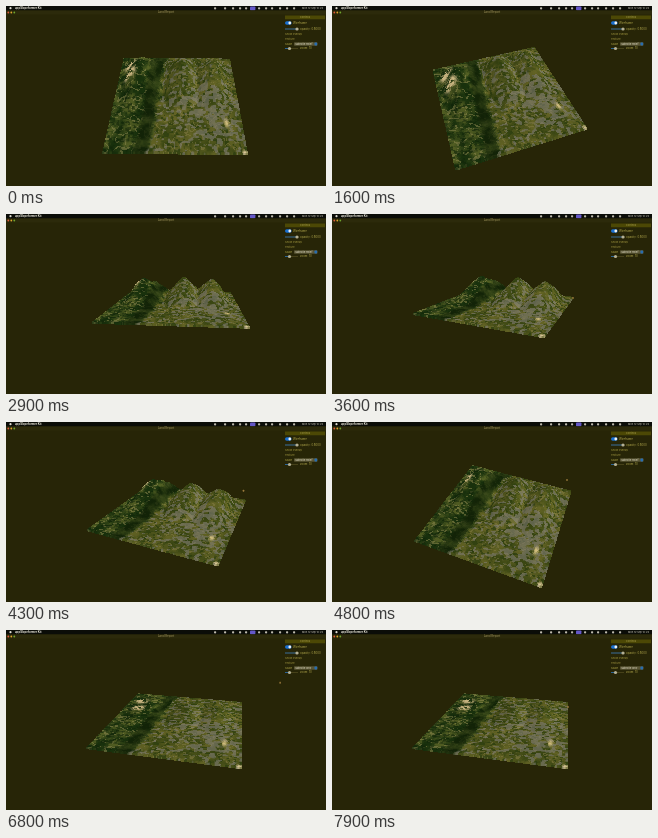
Animation of 320x180 px, one loop 8000 ms. Source, as an HTML page with a canvas:

```html
<!DOCTYPE html>
<html lang="en">
<head>
<meta charset="utf-8">
<title>Terrain viewer</title>
<style>
html, body { margin: 0; width: 100%; height: 100%; overflow: hidden; background: #272507; }
canvas { display: block; width: 320px; height: 180px; }
</style>
</head>
<body>
<canvas id="stage" width="320" height="180"></canvas>
<script>
const W = 320, H = 180, LOOP = 8000, N = 170, DIST = 4.1, BACK = '#272507';
const ctx = document.getElementById('stage').getContext('2d');

// time, yaw, pitch (degrees), scale, centre x, centre y
const VIEW = [
  [0, 0.8, 49.5, 60.5, 170, 92.8],
  [1600, -18.7, 50.5, 59.6, 170.6, 90.8],
  [2900, 5.4, 15, 60, 170, 91],
  [3600, 25, 16.4, 59, 170, 91],
  [4500, 23, 32, 59, 168.5, 92],
  [4800, 22, 48.5, 59, 167.8, 92],
  [5400, 12.4, 27.4, 62.8, 170.8, 91.8],
  [8000, 12.4, 27.4, 62.8, 170.8, 91.8]
];
const RELIEF = [[0, 1], [6500, 1], [6700, 0], [8000, 0]];

const clamp = (v, a = 0, b = 1) => Math.min(b, Math.max(a, v));
const smooth = v => { v = clamp(v); return v * v * (3 - 2 * v); };
const mix = (a, b, k) => a + (b - a) * k;
const blend = (a, b, k) => a.map((v, i) => mix(v, b[i], k));

function at(keys, t) {
  let i = 0;
  while (i < keys.length - 2 && t >= keys[i + 1][0]) i++;
  const a = keys[i], b = keys[i + 1];
  const k = clamp((t - a[0]) / (b[0] - a[0]));
  return blend(a, b, k).slice(1);
}

function hash(x, y) {
  const v = Math.sin(x * 127.1 + y * 311.7) * 43758.5453;
  return v - Math.floor(v);
}

function noise(x, y) {
  const i = Math.floor(x), j = Math.floor(y);
  const u = smooth(x - i), v = smooth(y - j);
  return mix(mix(hash(i, j), hash(i + 1, j), u), mix(hash(i, j + 1), hash(i + 1, j + 1), u), v);
}

const fbm = (x, y) => noise(x, y) * 0.55 + noise(x * 2.1, y * 2.1) * 0.3 + noise(x * 4.3, y * 4.3) * 0.15;

const peak = (x, z, px, pz, w, d) => Math.max(0, 1 - Math.hypot((x - px) / w, (z - pz) / d));

function height(x, z) {
  const rim = smooth((1 - Math.max(Math.abs(x), Math.abs(z))) / 0.3);
  const hills = Math.max(
    0.37 * peak(x, z, -0.62, -0.42, 0.45, 0.75),
    0.27 * peak(x, z, -0.45, -0.6, 0.35, 0.6),
    0.38 * peak(x, z, 0.1, -0.45, 0.36, 0.75),
    0.36 * peak(x, z, 0.6, -0.45, 0.36, 0.75)
  );
  return rim * (hills + 0.06 * fbm(x * 5 + 20, z * 5 + 20) - 0.02);
}

const near = (x, z, px, pz, r) => smooth(1 - Math.hypot(x - px, z - pz) / r);

function ground(x, z) {
  const n = fbm(x * 7 + 40, z * 7 + 40);
  const fine = noise(x * 30 + 90, z * 30 + 90);
  const streak = Math.abs(noise(x * 11 + z * 5 + 70, z * 12 - x * 6 + 70) - 0.5);
  const jag = noise(x * 5 + 15, z * 9 + 15) - 0.5;
  const edge = -0.27 - 0.08 * z + 0.14 * jag;

  let plain = blend([58, 70, 18], [98, 98, 36], smooth(n * 1.8 - 0.4));
  plain = blend(plain, [42, 60, 14], smooth((fine - 0.58) * 4) * 0.75);
  if (streak < 0.03) plain = blend(plain, [132, 124, 70], 0.5);
  const town = 0.1 + 0.3 * near(x, z, 0.6, 0.3, 0.8) + 0.12 * near(x, z, 0.2, 0.1, 0.6);
  const built = smooth((noise(x * 24 + 55, z * 24 + 55) + town - 0.72) * 5);
  plain = blend(plain, [128, 124, 116], built * 0.6);

  let forest = blend([24, 48, 12], [80, 92, 34], smooth(n * 2.4 - 0.65));
  if (streak < 0.05) forest = blend(forest, [136, 132, 76], 0.55);
  forest = blend(forest, [16, 36, 8], smooth((fine - 0.5) * 3) * 0.65);
  const band = smooth((0.13 - Math.abs(x - edge + 0.12 + 0.12 * jag)) / 0.07);
  forest = blend(forest, blend([17, 32, 6], [42, 58, 18], smooth(n * 2 - 0.5)), band * 0.85);

  let c = blend(forest, plain, smooth((x - edge + 0.03) / 0.06));
  const pale = near(x, z, -0.8, -0.65, 0.17) + near(x, z, -0.77, -0.35, 0.17);
  c = blend(c, [222, 200, 142], clamp(pale * smooth((fine - 0.2) * 2.5) * 1.6));
  c = blend(c, [208, 188, 125], near((x - 0.78) * 2.4, z - 0.5, 0, 0, 0.14));
  return blend(c, [225, 205, 155], near(x, z, 0.98, 0.98, 0.05));
}

const relief = new Float32Array(N * N);
const paint = new Uint8ClampedArray(N * N * 3);
const coord = i => i / (N - 1) * 2 - 1;

for (let j = 0; j < N; j++) {
  for (let i = 0; i < N; i++) {
    const x = coord(i), z = coord(j), k = j * N + i;
    relief[k] = height(x, z);
    const slope = (height(x + 0.03, z) - height(x - 0.03, z)) / 0.06;
    const light = clamp(1 - slope * 0.1, 0.88, 1.1);
    paint.set(ground(x, z).map(v => v * light), k * 3);
  }
}

ctx.fillStyle = BACK;
ctx.fillRect(0, 0, W, H);
const blank = ctx.getImageData(0, 0, W, H);
const frame = ctx.createImageData(W, H);

function terrain(t) {
  const [yaw, pitch, scale, cx, cy] = at(VIEW, t);
  const lift = at(RELIEF, t)[0];
  const a = yaw * Math.PI / 180, b = pitch * Math.PI / 180;
  const sa = Math.sin(a), ca = Math.cos(a), sb = Math.sin(b), cb = Math.cos(b);
  const px = frame.data;
  px.set(blank.data);
  for (let j = 0; j < N; j++) {
    const z = coord(j);
    for (let n = 0; n < N; n++) {
      const i = sa > 0 ? n : N - 1 - n;
      const x = coord(i), k = j * N + i, y = relief[k] * lift;
      const xr = x * ca - z * sa, zr = x * sa + z * ca;
      const s = scale / (1 - (zr * cb + y * sb) / DIST);
      const u = Math.floor(cx + xr * s - 0.5), v = Math.floor(cy + (zr * sb - y * cb) * s - 0.5);
      for (let q = 0; q < 4; q++) {
        const o = ((v + (q >> 1)) * W + u + (q & 1)) * 4;
        px[o] = paint[k * 3];
        px[o + 1] = paint[k * 3 + 1];
        px[o + 2] = paint[k * 3 + 2];
      }
    }
  }
  ctx.putImageData(frame, 0, 0);
}

function box(x, y, w, h, color, r = 0) {
  ctx.fillStyle = color;
  ctx.beginPath();
  ctx.roundRect(x, y, w, h, r);
  ctx.fill();
}

const dot = (x, y, r, color) => box(x - r, y - r, r * 2, r * 2, color, r);

function label(text, x, y, size, color, align = 'left', weight = 400) {
  ctx.font = `${weight} ${size}px Inter, sans-serif`;
  ctx.textAlign = align;
  ctx.textBaseline = 'middle';
  ctx.fillStyle = color;
  ctx.fillText(text, x, y);
}

function menuBar() {
  box(0, 0, W, 4.5, '#0b0d08');
  dot(4.5, 2.2, 1.1, '#dedbd0');
  label('appSlopeformer Kit', 9, 2.4, 2.8, '#f2efe2', 'left', 700);
  for (const x of [209, 219, 227, 234, 240, 253, 260, 266, 274, 281, 288]) {
    box(x - 1, 1.2, 2.2, 2.2, '#bdb9ac', 0.8);
  }
  box(244, 0.4, 5.4, 3.8, '#6558c8', 0.8);
  label('Mon 12 Sep 10:24', 317, 2.4, 2.5, '#d5d1c3', 'right');
  box(0, 4.5, W, 4, '#2c2a0b');
  ['#e05a38', '#dfa62b', '#6fa52d'].forEach((c, i) => dot(2.3 + i * 3, 6.5, 0.9, c));
  label('Land Report', 160, 6.6, 2.9, '#a69a60', 'center');
}

function slider(y, x, w, knob, text) {
  box(279, y - 0.4, w, 0.8, '#4e481f');
  box(279, y - 0.4, knob - 279, 0.8, '#266db4');
  dot(knob, y, 1.6, '#b5b196');
  label(text, x, y, 2.8, '#b3a94c');
}

function panel(flat) {
  box(279, 9.5, 40, 3.8, '#4c4805');
  label('Controls', 299, 11.5, 2.6, '#aaa04d', 'center');
  box(279, 15.2, 6.6, 3.6, '#1970d2', 1.8);
  dot(283.8, 17, 1.4, '#f1f1ed');
  label('Wireframe', 287, 17, 2.8, '#b3a94c');
  slider(23, 294, 14, 291, 'opacity: 0.8000');
  label('Show overlay', 279, 28.4, 2.7, '#a39940');
  label('Texture', 279, 33.2, 2.7, '#a39940');
  label('Scale', 279, 38, 2.7, '#b3a94c');
  box(288, 36.2, 23.5, 3.6, '#5a5636', 0.8);
  label(flat ? 'Satellite only' : 'Satellite relief', 289.2, 38.1, 2.7, '#e1ddc6');
  box(308.5, 36.6, 2.6, 2.8, '#286daf', 0.6);
  slider(42.5, 294, 13, 283.5, 'zoom: 10');
}

// time, x, y
const POINTER = [
  [3600, 241, 84], [4800, 235, 58], [5400, 297, 38],
  [6500, 297, 38], [7300, 236, 77], [8000, 236, 77]
];

function pointer(t) {
  if (t < POINTER[0][0]) return;
  const [x, y] = at(POINTER, t);
  box(x - 0.7, y - 1, 1.4, 2, '#9b7a3c', 0.4);
}

function draw(now) {
  const t = Math.floor(now % LOOP / 100) * 100;
  terrain(t);
  menuBar();
  panel(t >= 6500);
  pointer(t);
  requestAnimationFrame(draw);
}

requestAnimationFrame(draw);
</script>
</body>
</html>
```
